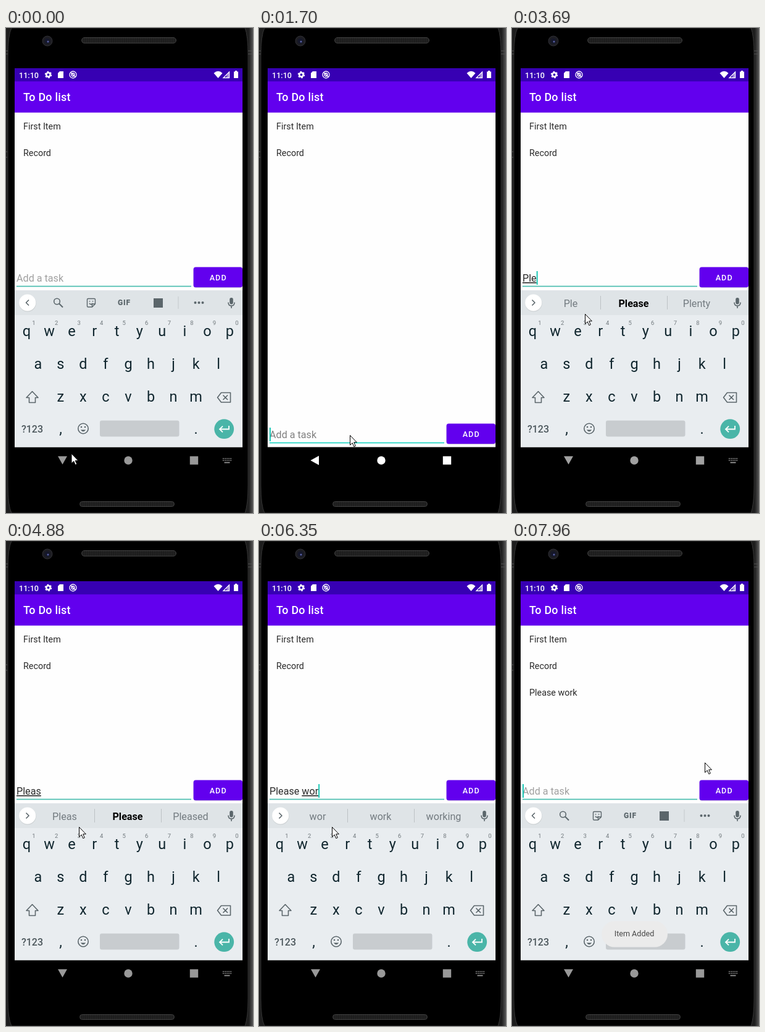
An HTML page that plays this animation: 400 by 784 pixels, repeating every 8000 ms.

```html
<!DOCTYPE html>
<html lang="en">
<head>
<meta charset="utf-8">
<title>To Do list</title>
<style>
  html, body { margin: 0; width: 100%; height: 100%; overflow: hidden; background: #000; }
  svg { display: block; width: 100vw; height: 100vh; }
  text { font-family: Roboto, sans-serif; white-space: pre; }
  .mid { text-anchor: middle; }
  .bold { font-weight: 500; }
  .item { font-size: 14.35px; fill: #2a2a2a; }
  .field { font-size: 16.15px; fill: #2a2a2a; }
  .composing { text-decoration: underline; }
  .key { font-size: 23.5px; fill: #10262e; }
  .digit { font-size: 9.5px; fill: #71797d; }
  .word { font-size: 16.15px; fill: #737b80; }
  .best { fill: #000; font-weight: 700; }
  .line { fill: none; stroke: #5b666b; stroke-width: 1.6; stroke-linejoin: round; }
  .solid { fill: #5b666b; }
</style>
</head>
<body>
<svg viewBox="0 0 400 784">
  <defs>
    <clipPath id="screen"><rect x="14" y="65" width="369" height="612.6"/></clipPath>
    <pattern id="mesh" width="3" height="3" patternUnits="userSpaceOnUse">
      <rect width="3" height="3" fill="#1b1b1b"/><circle cx="1.5" cy="1.5" r=".8" fill="#353535"/>
    </pattern>
    <linearGradient id="edge">
      <stop offset="0" stop-color="#1d1d1d"/><stop offset="1" stop-color="#585858"/>
    </linearGradient>
  </defs>

  <!-- phone body -->
  <rect width="400" height="784" fill="#1d1d1d"/>
  <rect x="393" width="7" height="784" fill="url(#edge)"/>
  <path d="M9 0Q3 12 3 45V740Q3 772 9 784H387Q392 770 392 740V45Q392 12 387 0Z" fill="#000" stroke="#353535"/>
  <path d="M0 37H3M0 42H3M392 37H400M392 42H400M0 200H2M0 209H2" stroke="#555"/>
  <g fill="url(#mesh)" stroke="#3e3e3e">
    <rect x="122.5" y="15.5" width="153" height="9" rx="4.5"/>
    <rect x="119.5" y="765.5" width="153" height="8" rx="4"/>
  </g>
  <circle cx="67" cy="21" r="8" fill="#1d1d22" stroke="#303036"/>
  <circle cx="67" cy="21" r="4.5" fill="#15172a"/>
  <circle cx="68" cy="22" r="1.5" fill="#5a62a8"/>

  <g clip-path="url(#screen)">
    <rect x="14" y="65" width="369" height="613" fill="#fefefe"/>
    <rect x="14" y="86" width="369" height="50.7" fill="#6200ee"/>
    <rect x="14" y="65" width="369" height="21.3" fill="#3700b3"/>
    <g fill="#fff">
      <text x="21" y="80.5" class="bold" font-size="12.6">11:10</text>
      <text x="28" y="118" class="bold" font-size="17.95" letter-spacing=".224">To Do list</text>
      <path d="M84 73L87 70H93V81H84Z"/>
      <path d="M336.5 73Q343.5 66.5 350.5 73L343.5 81Z"/>
      <path d="M361.5 71V80.5H352Z" fill="none" stroke="#fff" stroke-width="1.3"/>
      <path d="M357 75L362 70V81H357Z" opacity=".5"/>
      <path d="M369 70.5H371V69H374V70.5H376V81H369Z"/>
    </g>
    <g fill="none" stroke="#fff">
      <circle cx="68.5" cy="75.5" r="3.2" stroke-width="2.6"/>
      <circle cx="68.5" cy="75.5" r="4.9" stroke-width="1.8" stroke-dasharray="2.565"/>
      <circle cx="108.5" cy="75.5" r="5.5" stroke-width="1.3"/>
      <circle cx="108.5" cy="75.5" r="2.5" stroke-width="1.3"/>
      <path d="M105 72L112.5 79.5" stroke-width="1.4"/>
    </g>
    <text class="item" x="28" y="163.5">First Item</text>
    <text class="item" x="28" y="206.5">Record</text>
    <text class="item" x="28" y="249.5" id="added">Please work</text>

    <g id="entry">
      <text class="field" x="17" y="410" id="hint">Add a task</text>
      <text class="field" x="17" y="410" id="typed"><tspan id="done"></tspan><tspan id="composing" class="composing"></tspan></text>
      <rect id="rule" x="17" y="416.7" width="283" height="1.7"/>
      <rect id="caret" y="393" width="2" height="22" fill="#1cc9b7"/>
      <rect x="303.6" y="387.6" width="79.4" height="32.5" rx="4" fill="#000" opacity=".15"/>
      <rect x="303.6" y="386.6" width="79.4" height="32.7" rx="3.6" fill="#6200ee"/>
      <rect id="press" x="303.6" y="386.6" width="79.4" height="32.7" rx="3.6" fill="#fff" opacity=".22"/>
      <text class="mid bold" x="343.7" y="408" font-size="12.55" letter-spacing="1.12" fill="#fff">ADD</text>
    </g>

    <g id="keyboard">
      <rect x="14" y="424" width="369" height="254" fill="#e9edf0"/>
      <rect x="14" y="424" width="369" height="40" fill="#dfe4e7"/>
      <circle cx="35" cy="445" r="13.7" fill="#000" opacity=".08"/>
      <circle cx="34.7" cy="444" r="13.5" fill="#fff"/>
      <path id="chevron" class="line"/>
      <g class="solid">
        <rect x="362.2" y="436" width="5.6" height="10.5" rx="2.8"/>
        <path d="M360 443.5Q360 449 365 449T370 443.5M365 449V453" class="line"/>
      </g>
      <g id="tools">
        <circle cx="82.5" cy="442" r="4.8" class="line"/>
        <path d="M86 445.5L92 451.5" class="line" style="stroke-width:2"/>
        <path d="M133 437.5H143Q144.5 437.5 144.5 439V446L139.5 451H133Q131.5 451 131.5 449.5V439Q131.5 437.5 133 437.5ZM144.5 446H139.5V451M135 445Q137.5 448.5 140 445M135.5 441V442.5M140.5 441V442.5" class="line" style="stroke-width:1.4"/>
        <text class="mid solid" x="191.5" y="448.3" font-size="12" font-weight="900" letter-spacing=".8">GIF</text>
        <rect x="239" y="437" width="15" height="15" class="solid"/>
        <path d="M279 434V454" stroke="#c5cacd"/>
        <circle cx="306.5" cy="444" r="2" class="solid"/>
        <circle cx="312.5" cy="444" r="2" class="solid"/>
        <circle cx="318.5" cy="444" r="2" class="solid"/>
      </g>
      <g id="words">
        <path d="M143.5 433V455M251.5 433V455" stroke="#bcc2c5"/>
        <text class="mid word" x="95" y="450.5"></text>
        <text class="mid word" x="197" y="450.5"></text>
        <text class="mid word" x="299" y="450.5"></text>
      </g>
      <g id="keys"></g>
      <path d="M42.5 587.5L52 597.5H47.5V605.5H37.5V597.5H33Z" class="line"/>
      <path d="M348.5 589.5H363.5V605H348.5L342.5 597.2ZM351.5 593.5L359 601M359 593.5L351.5 601" class="line"/>
      <text class="mid bold" x="42.5" y="653.5" font-size="16" fill="#4d585d">?123</text>
      <circle cx="125" cy="647.5" r="8.2" class="line"/>
      <path d="M120.8 649.5Q125 655 129.2 649.5Z" class="solid"/>
      <circle cx="122" cy="645" r="1.3" class="solid"/>
      <circle cx="128" cy="645" r="1.3" class="solid"/>
      <rect x="152" y="634.5" width="128.5" height="26" rx="3" fill="#c8cccf"/>
      <circle cx="353.2" cy="648.2" r="15.9" fill="#4ab5a8"/>
      <path d="M361 643V648.5H346.5M351 643.7L346 648.5L351 653.3" fill="none" stroke="#fff" stroke-width="1.8"/>
    </g>
    <g id="toast">
      <rect x="145" y="614.5" width="107" height="42" rx="21" fill="#ebebeb"/>
      <text class="mid" x="198" y="639.3" font-size="12.6" fill="#4a4a4a">Item Added</text>
    </g>
  </g>

  <!-- navigation bar -->
  <ellipse id="ripple" cx="91" cy="699" rx="40" ry="21.5" fill="#fff"/>
  <g id="nav" fill="#fff">
    <path id="back"/>
    <circle cx="198" cy="699" r="6.7"/>
    <rect x="297.8" y="692.3" width="13.4" height="13.4"/>
    <g id="switcher" fill="none" stroke="#fff" stroke-width="1.7">
      <path d="M351 696H365M351 699H365" stroke-dasharray="1.7 1.375"/>
      <path d="M353.5 702.5H362.5"/>
    </g>
  </g>
  <path id="mouse" d="M.5 .5V16.2L4.2 12.8L6.8 18.7L9.3 17.6L6.7 11.8H11.4Z" fill="#fff" stroke="#000"/>
</svg>
<script>
const LOOP = 8000;
const $ = id => document.getElementById(id);
const show = (id, on) => $(id).style.display = on ? '' : 'none';
const shift = (id, x, y) => $(id).setAttribute('transform', `translate(${x} ${y})`);

function addText(cls, x, y, str) {
  const el = document.createElementNS('http://www.w3.org/2000/svg', 'text');
  el.setAttribute('class', 'mid ' + cls);
  el.setAttribute('x', x);
  el.setAttribute('y', y);
  el.textContent = str;
  $('keys').append(el);
}

const KEY_W = 36.55, ROW_H = 52.8;
[['qwertyuiop', 33.5], ['asdfghjkl', 51.8], ['zxcvbnm', 88.3]].forEach(([row, x], r) =>
  [...row].forEach((c, i) => {
    addText('key', x + i * KEY_W, 498 + r * ROW_H, c);
    if (!r) addText('digit', x + i * KEY_W + 11.5, 480.3, (i + 1) % 10);
  }));
addText('key', 88.5, 656, ',');
addText('key', 307.5, 656, '.');

// Each step changes only the listed parts; slide is the keyboard's drop in px.
const steps = [
  [0, { mouse: [105.5, 687.5], raised: true, slide: 0, nav: .6, ripple: 0, caret: false,
        done: '', word: '', picks: null, best: false, press: false, added: false, toast: 0 }],
  [120, { mouse: [95, 695] }],
  [250, { mouse: [91, 697], ripple: .2, nav: 1 }],
  [390, { raised: false, slide: 110 }],
  [520, { slide: 254, ripple: .16 }],
  [660, { caret: true, ripple: .1 }],
  [930, { mouse: [110, 694], ripple: .04 }],
  [1060, { mouse: [190, 686], ripple: 0 }],
  [1180, { mouse: [166, 668], caret: false }],
  [1330, { mouse: [147, 658] }],
  [1700, { caret: true }],
  [1850, { raised: true, slide: 60, caret: false }],
  [1970, { slide: 0 }],
  [2250, { caret: true }],
  [2790, { caret: false, nav: .94 }],
  [3060, { nav: .84 }],
  [3330, { caret: true, nav: .74, mouse: [130, 560] }],
  [3460, { word: 'P', picks: ['P', 'Please', 'Put'], mouse: [118, 462], nav: .7 }],
  [3570, { word: 'Pl', picks: ['Pl', 'Please', 'Place'], best: true, nav: .66 }],
  [3690, { word: 'Ple', picks: ['Ple', 'Please', 'Plenty'], nav: .63 }],
  [3840, { word: 'Plea', nav: .62 }],
  [4110, { picks: ['Plea', 'Please', 'Pleased'], nav: .61 }],
  [4250, { nav: .6 }],
  [4380, { word: 'Pleas', picks: ['Pleas', 'Please', 'Pleased'] }],
  [4880, { caret: false }],
  [5410, { word: 'Please', caret: true }],
  [5540, { picks: ['Please', 'Pleased', 'Pleas'], best: false }],
  [5960, { done: 'Please ', word: '', picks: ['let', 'send', 'be'] }],
  [6090, { word: 'w', picks: ['w', 'with', 'was'] }],
  [6220, { word: 'wo', picks: ['wo', 'would', 'work'] }],
  [6340, { word: 'wor', picks: ['wor', 'work', 'working'] }],
  [6470, { word: 'work', picks: ['work', 'working', 'works'] }],
  [7000, { caret: false, mouse: [150, 454] }],
  [7130, { mouse: [222, 437] }],
  [7270, { mouse: [277, 421] }],
  [7420, { mouse: [324, 403] }],
  [7560, { press: true, caret: true }],
  [7690, { done: '', word: '', picks: null, added: true }],
  [7830, { press: false, mouse: [320, 382], toast: .3 }],
  [7960, { mouse: [312, 358], toast: 1 }]
];

function draw(t) {
  const s = Object.assign({}, ...steps.filter(([at]) => at <= t).map(([, part]) => part));
  const open = s.slide < 254;

  shift('mouse', ...s.mouse);
  shift('entry', 0, s.raised ? 0 : 253);
  shift('keyboard', 0, s.slide);

  $('done').textContent = s.done;
  $('composing').textContent = s.word;
  const empty = !(s.done + s.word);
  show('hint', empty);
  $('hint').style.fill = s.raised ? '#a0a0a0' : '#808080';
  $('rule').style.fill = s.raised ? '#49bcae' : '#1fd5c4';
  show('caret', s.caret);
  $('caret').setAttribute('x', 17 + (empty ? 0 : $('typed').getComputedTextLength()));

  show('tools', !s.picks);
  show('words', s.picks);
  $('chevron').setAttribute('d', s.picks ? 'M32.5 439.5L37 444L32.5 448.5' : 'M37 439.5L32.5 444L37 448.5');
  if (s.picks) $('words').querySelectorAll('text').forEach((el, i) => {
    el.textContent = s.picks[i];
    el.classList.toggle('best', s.best && i === 1);
  });

  show('press', s.press);
  show('added', s.added);
  $('toast').style.opacity = s.toast;
  $('ripple').style.opacity = s.ripple;
  $('nav').style.opacity = s.nav;
  show('switcher', open);
  $('back').setAttribute('d', open ? 'M84 692.3H99L91.5 705.5Z' : 'M83.4 699L97 691.5V706.5Z');
}

const start = performance.now();
function tick() {
  draw((performance.now() - start) % LOOP);
  requestAnimationFrame(tick);
}
tick();
</script>
</body>
</html>
```
